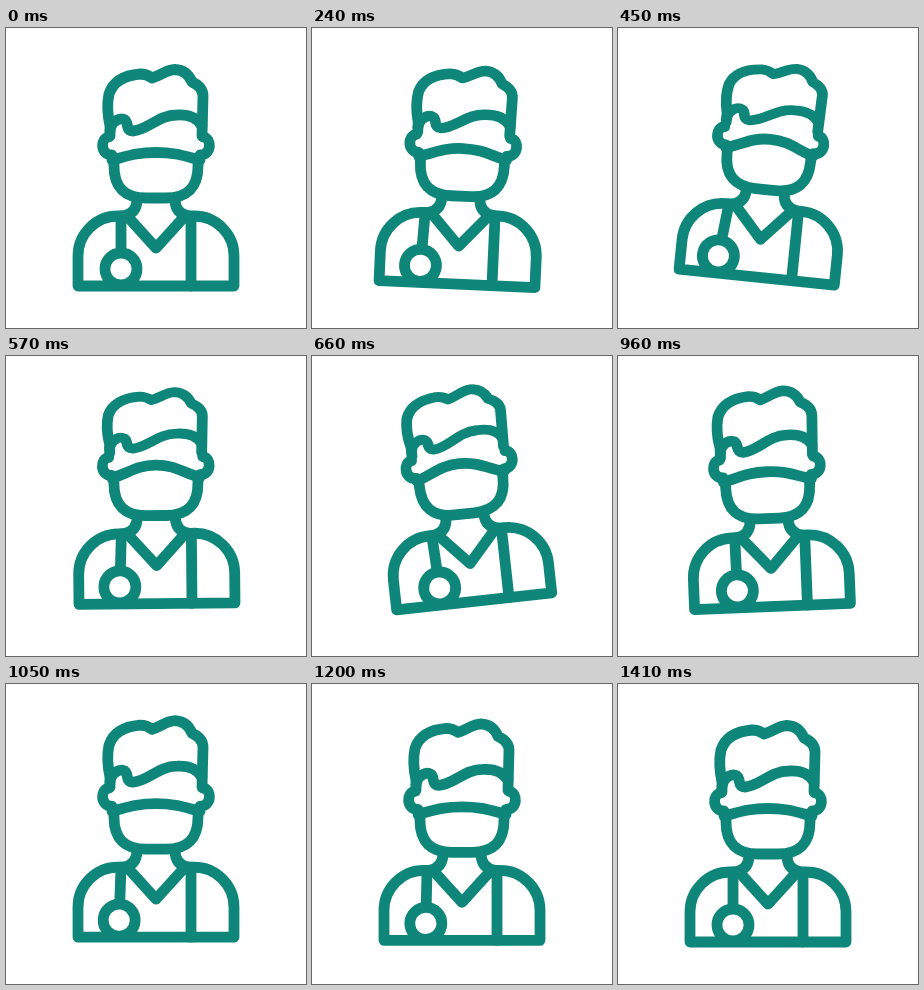
An HTML page for the animation above (1530 ms loop, 300x300 px).

```html
<!DOCTYPE html>
<html lang="en">
<head>
<meta charset="utf-8">
<title>Doctor</title>
<style>
  html, body { margin: 0; height: 100%; overflow: hidden; background: #fff; }
  svg { display: block; width: 100%; height: 100%; }
</style>
</head>
<body>
<svg viewBox="0 0 300 300" fill="none" stroke="#0f867a" stroke-width="10.8" stroke-linecap="round" stroke-linejoin="round">
  <g id="doctor">
    <path d="M117 188H112A40 40 0 0 0 72 228V258H228V228A40 40 0 0 0 188 188H183"/>
    <path d="M121 188L150 220L179 188M185 189V258"/>
    <path d="M131 171Q131 186 117 188M169 171Q169 186 183 188"/>
    <path d="M108 132V138Q108 170 140 170H160Q192 170 192 138V132"/>
    <path id="mask"/>
    <path id="ears" d="M103 109C94 110 94 127 106 127M197 109C206 110 206 127 194 127"/>
    <g id="hair">
      <path d="M104 108V98Q100 80 103 66C108 51 122 47 134 46Q141 46 146 50C156 47 160 42 169 41.500Q181 42 186 54Q197 59 197 68L196 108"/>
      <path d="M104 103C105 93 114 89 119 92C123 95 119 103 127 103C142 102 152 87 171 87Q189 86 196 98"/>
    </g>
    <g id="stethoscope">
      <path d="M115 188V223"/>
      <circle cx="115" cy="241" r="16"/>
    </g>
  </g>
</svg>
<script>
const LOOP = 1530, STEP = 30;
const part = id => document.getElementById(id);
const move = (id, transform) => part(id).setAttribute("transform", transform);

// Progress from 0 to 1 between two times, linear and eased.
const progress = (t, from, to) => Math.min(1, Math.max(0, (t - from) / (to - from)));
const ramp = (t, from, to) => {
  const u = progress(t, from, to);
  return u * u * (3 - 2 * u);
};

function draw() {
  const t = Math.floor(performance.now() % LOOP / STEP) * STEP;
  const lean = ramp(t, 60, 450);
  const tilt = 5.8 * lean - 12.6 * ramp(t, 450, 690) + 6.8 * ramp(t, 820, 1050);
  const rise = 8.3 * progress(t, 60, 450) ** 2 + 3.7 * ramp(t, 450, 670);
  const lift = rise * (1 - progress(t, 840, 1410)) ** 2;
  const squash = lean - ramp(t, 780, 1050);
  const swing = 5.7 * lean - 10.2 * ramp(t, 450, 750) + 6.5 * ramp(t, 840, 1050) - 2 * ramp(t, 1050, 1410);

  move("doctor", `translate(0 ${-lift}) rotate(${tilt} 150 146)`);
  move("hair", `translate(0 100) scale(1 ${1 - 0.09 * squash}) translate(0 -100)`);
  move("ears", `translate(0 ${2.5 * squash})`);
  move("stethoscope", `rotate(${swing} 115 188)`);
  const top = 124.5 - 5 * squash;
  part("mask").setAttribute("d", `M106 132C122 128 130 ${top} 150 ${top}S178 128 194 132`);
  requestAnimationFrame(draw);
}
draw();
</script>
</body>
</html>
```
